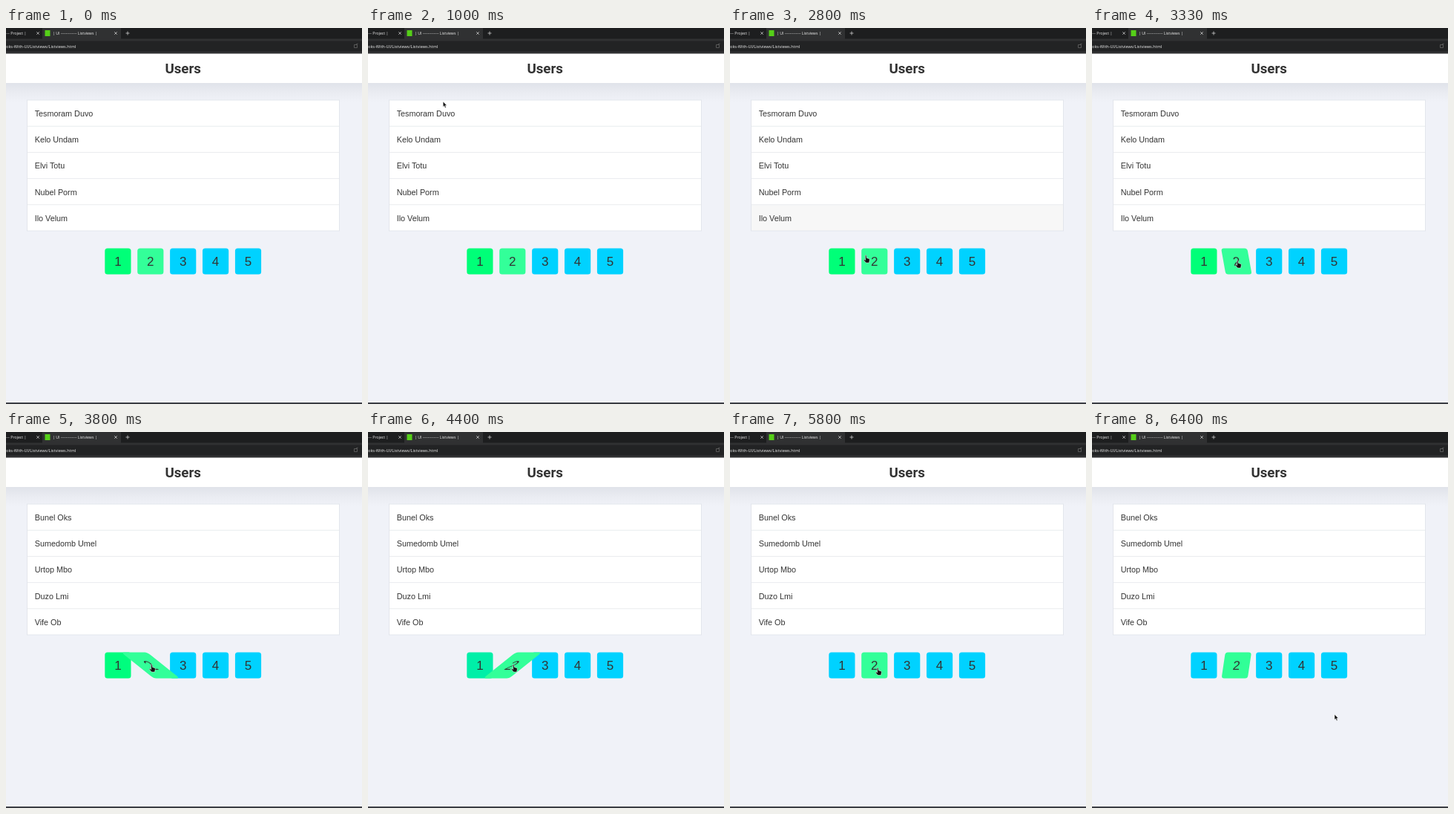
Write an HTML page that moves like this. It is 480 px wide and 506 px high and loops after 6.53 s.

```html
<!DOCTYPE html>
<html lang="en">
<head>
<meta charset="utf-8">
<title>Users</title>
<style>
  html, body { margin: 0; width: 100%; height: 100%; overflow: hidden; background: #f0f2f8; }
  svg { display: block; font-family: "Liberation Sans", Arial, sans-serif; fill: #333; }
  .chrome { font: 5.2px "Open Sans", sans-serif; fill: #eee; }
  .title { font: bold 18.7px Roboto, sans-serif; text-anchor: middle; }
  .name { font-size: 10.8px; }
  .digit { font-size: 17px; text-anchor: middle; }
  .cursor { fill: #111; stroke: #fff; stroke-width: .5; }
</style>
</head>
<body>
<svg width="480" height="506" viewBox="0 0 480 506">
  <defs>
    <linearGradient id="shade" x2="0" y2="1">
      <stop offset="0" stop-color="#dfe2e9"/>
      <stop offset=".5" stop-color="#e9ebf1"/>
      <stop offset="1" stop-color="#f0f2f8"/>
    </linearGradient>
  </defs>
  <rect width="480" height="506" fill="#f0f2f8"/>
  <rect y="73" width="480" height="26" fill="url(#shade)"/>
  <rect y="34" width="480" height="40" fill="#fff"/>
  <text class="title" x="238.7" y="61.3">Users</text>

  <rect width="480" height="15" fill="#1d1e1f"/>
  <rect x="49" width="106" height="15" fill="#303132"/>
  <rect y="14.5" width="480" height="20" fill="#303132"/>
  <rect y="17.5" width="480" height="14" fill="#222324"/>
  <g class="chrome">
    <text x="0" y="8.8">--- Project |</text>
    <text x="63" y="8.8">| UI ------------- Listviews |</text>
    <text x="0" y="26.8" font-size="5.6">oks-With-UI/Listviews/Listviews.html</text>
  </g>
  <rect x="52.5" y="3" width="7" height="8" fill="#55cf18"/>
  <path d="M41.3 5.2l3.6 3.6m0-3.6l-3.6 3.6M146.2 5.2l3.6 3.6m0-3.6l-3.6 3.6M161.5 7h5m-2.5-2.5v5"
        stroke="#ccc" stroke-width=".8"/>
  <path d="M469.5 22.5h4v4h-4zM472 22l2.5-1" fill="none" stroke="#666" stroke-width=".8"/>
  <rect y="504" width="480" height="2" fill="#3b3d43"/>

  <g id="list"></g>
  <rect x="28.5" y="97" width="421" height="176" fill="none" stroke="#e0e4ea" stroke-width=".9"/>
  <g id="pager"></g>
  <path id="cursor" class="cursor"/>
</svg>
<script>
const LOOP = 6530, FADE = 2300, ROW = 35.2, TOP = 97;
const HOVER = 2950, CLICK = 3450, LEAVE = 6050;
const BLUE = [0, 210, 255], GREEN = [0, 255, 120], MINT = [51, 255, 153];
const WHITE = [255, 255, 255], GREY = [234, 234, 234];
const PAGES = [
  ["Tesmoram Duvo", "Kelo Undam", "Elvi Totu", "Nubel Porm", "Ilo Velum"],
  ["Bunel Oks", "Sumedomb Umel", "Urtop Mbo", "Duzo Lmi", "Vife Ob"]
];
// Pointer path: time, x, y
const PATH = [
  [200, 34, 6], [800, 100, 84], [1470, 104, 134], [1930, 107, 180],
  [2130, 112, 194], [2620, 160, 273], [2800, 183, 306], [3050, 196, 313],
  [5700, 196, 313], [6000, 205, 326], [6130, 245, 388], [6400, 327, 380]
];
const ARROW = "M0 0v7.2l1.6-1.4 1.2 2.7 1.3-.6-1.2-2.6h2.2z";
const HAND = "M-.7 0q.8-.8 1.5 0l.5 3.4 3.2 1q1 .4.8 1.7l-.7 3.9h-4.2l-3-3.4q-.5-1.2.8-1l1.5.8z";

const $ = id => document.getElementById(id);
const clamp = v => Math.max(0, Math.min(1, v));
const lerp = (a, b, p) => a + (b - a) * p;
const mix = (a, b, p) => `rgb(${a.map((v, i) => Math.round(lerp(v, b[i], p)))})`;

function add(parent, tag, attrs) {
  const el = document.createElementNS("http://www.w3.org/2000/svg", tag);
  for (const key in attrs) el.setAttribute(key, attrs[key]);
  return parent.appendChild(el);
}

// cubic-bezier(.42, 0, .58, 1)
function easeInOut(x) {
  let lo = 0, hi = 1, s = .5;
  for (let i = 0; i < 24; i++) {
    s = (lo + hi) / 2;
    const bx = 1.26 * s * (1 - s) ** 2 + 1.74 * s * s * (1 - s) + s ** 3;
    if (bx < x) lo = s; else hi = s;
  }
  return s * s * (3 - 2 * s);
}
const transition = (t, start) => easeInOut(clamp((t - start) / FADE));

const rows = PAGES[0].map((_, i) => {
  const y = TOP + i * ROW;
  const box = add($("list"), "rect", { x: 28.5, y, width: 421, height: ROW });
  if (i) add($("list"), "path", { d: `M29 ${y}h420`, stroke: "#e8eaee", "stroke-width": .9 });
  return { box, label: add($("list"), "text", { class: "name", x: 38.7, y: y + 22 }) };
});

const buttons = [1, 2, 3, 4, 5].map(n => {
  const g = add($("pager"), "g", {});
  const box = add(g, "rect", { x: -17.6, y: -17.6, width: 35.2, height: 35.2, rx: 3.5, fill: mix(BLUE, BLUE, 0) });
  add(g, "text", { class: "digit", y: 6 }).textContent = n;
  const place = `translate(${150.9 + (n - 1) * 43.9} 314)`;
  g.setAttribute("transform", place);
  return { g, box, place };
});
// A skewed button lies over its neighbours
$("pager").append(buttons[1].g);

function pointer(t) {
  const i = Math.max(1, PATH.findIndex(k => k[0] >= t));
  const [a, b] = [PATH[i - 1], PATH[i]];
  const p = clamp((t - a[0]) / (b[0] - a[0]));
  return [lerp(a[1], b[1], p), lerp(a[2], b[2], p)];
}

// Moment at which the pointer goes down past a height inside the list
function crossing(y) {
  const i = PATH.findIndex(k => k[2] >= y);
  const [a, b] = [PATH[i - 1], PATH[i]];
  return lerp(a[0], b[0], (y - a[2]) / (b[2] - a[2]));
}
const edges = [0, 1, 2, 3, 4, 5].map(i => crossing(TOP + i * ROW));

function draw(t) {
  const names = PAGES[t >= CLICK ? 1 : 0];
  rows.forEach(({ box, label }, i) => {
    const glow = clamp((t - edges[i] - 60) / 200) - clamp((t - edges[i + 1] - 60) / 200);
    box.setAttribute("fill", mix(WHITE, GREY, Math.max(0, glow)));
    label.textContent = names[i];
  });

  const inP = transition(t, HOVER), outP = transition(t, LEAVE);
  buttons[0].box.setAttribute("fill", mix(GREEN, BLUE, transition(t, CLICK)));
  buttons[1].box.setAttribute("fill", outP ? mix(MINT, GREEN, outP) : mix(BLUE, MINT, inP));
  buttons[1].g.setAttribute("transform", `${buttons[1].place} skewX(${180 * (inP - outP)})`);

  const [x, y] = pointer(t);
  const onButton = x > 177 && x < 213 && y > 296 && y < 332;
  $("cursor").setAttribute("d", onButton ? HAND : ARROW);
  $("cursor").setAttribute("transform", `translate(${x} ${y})`);
  $("cursor").setAttribute("visibility", t < 199 ? "hidden" : "visible");
}

function tick() {
  const t = performance.now() % LOOP;
  // 15 pictures a second, as in a screen recording
  draw(Math.min(6400, Math.floor((t + 5) * .015) / .015));
  requestAnimationFrame(tick);
}
tick();
</script>
</body>
</html>
```
